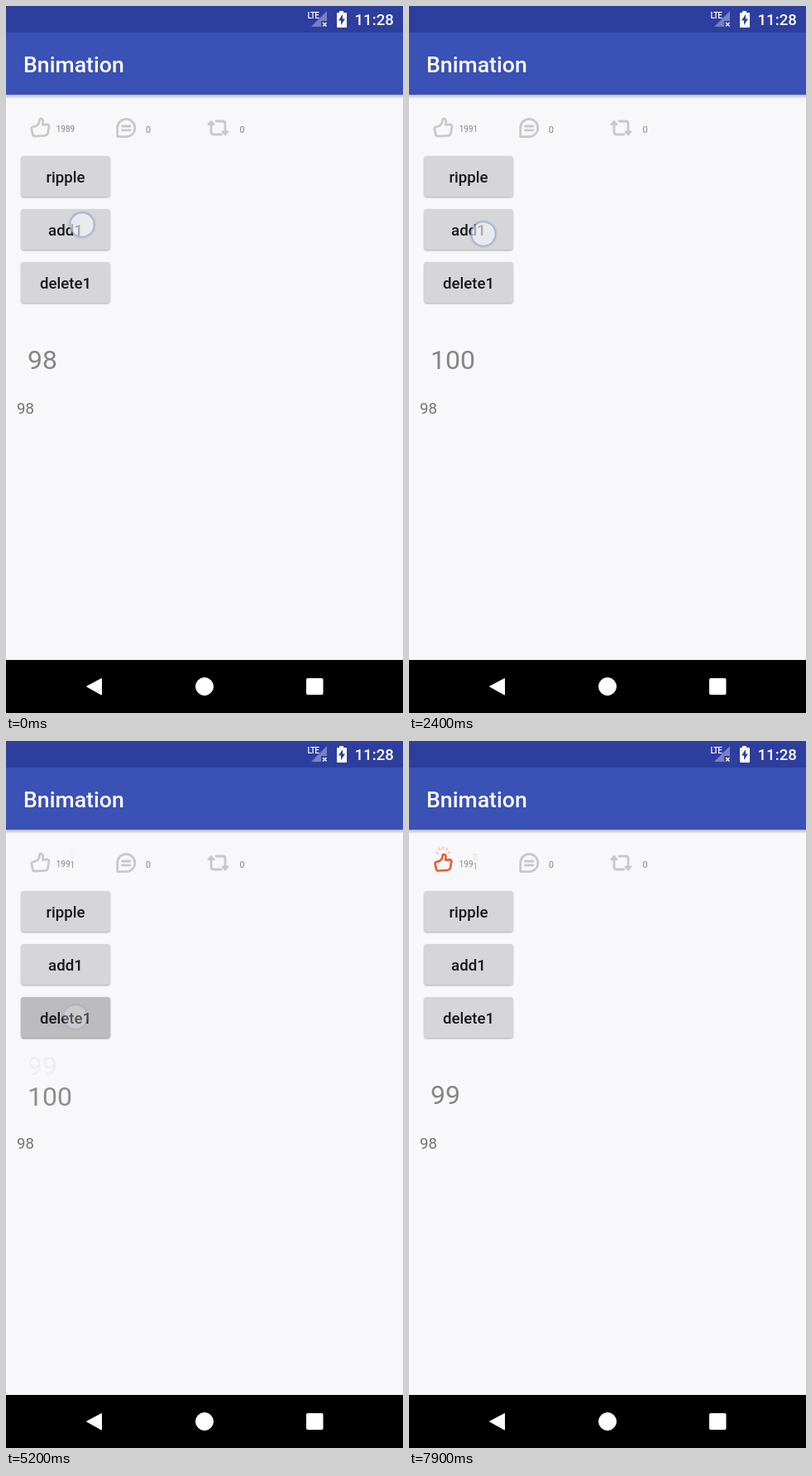
Recreate the animation shown at these times as an HTML page. Size 480 px wide and 853 px high, loop 8 s.

```html
<!DOCTYPE html>
<html lang="en">
<head>
<meta charset="utf-8">
<title>Bnimation</title>
<style>
  html, body { margin: 0; width: 100%; height: 100%; overflow: hidden; background: #f8f7fa; }
  svg { display: block; width: 100%; height: 100%; }
  text { font-family: Roboto, "Liberation Sans", sans-serif; }
  .medium { font-weight: 500; }
  .line { fill: none; stroke: #c9c8cb; stroke-width: 2.8; stroke-linecap: round; stroke-linejoin: round; }
</style>
</head>
<body>
<svg viewBox="0 0 480 853" id="stage">
  <defs>
    <linearGradient id="fade" x2="0" y2="1">
      <stop stop-color="#000" stop-opacity=".3"/>
      <stop offset="1" stop-color="#000" stop-opacity="0"/>
    </linearGradient>
    <filter id="soft" x="-10%" y="-20%" width="120%" height="140%"><feGaussianBlur stdDeviation="1.2"/></filter>
  </defs>
  <rect width="480" height="853" fill="#f8f7fa"/>

  <!-- status bar and toolbar -->
  <rect y="106" width="480" height="6" fill="url(#fade)"/>
  <rect width="480" height="107" fill="#3a51b5"/>
  <rect width="480" height="32" fill="#2d3e9f"/>
  <g fill="#fff">
    <path d="M369 25L388 6V18H381V25Z" opacity=".35"/>
    <path d="M383 20l4.500 4.500m0-4.500l-4.500 4.500" stroke="#fff" stroke-width="1.500"/>
    <text class="medium" x="364.500" y="15" font-size="10" letter-spacing="-.9">LTE</text>
    <path d="M403 6h5v2h3q1 0 1 1v16q0 1-1 1h-10q-1 0-1-1v-16q0-1 1-1h2z"/>
    <path d="M407 10l-5 7.500h3v5.500l5-7.500h-3z" fill="#2d3e9f"/>
    <text class="medium" x="421.500" y="23" font-size="18.670">11:28</text>
    <text class="medium" x="21" y="79.500" font-size="26.670">Bnimation</text>
  </g>

  <!-- action row -->
  <g id="thumb" class="line">
    <path d="M32 146L36 145C39 143.500 40.500 140.500 40.500 137.500C41 135.300 44.300 135.500 44.700 138.500L44.500 143.300L49.500 142.900C51.500 142.900 52.200 144.200 52 145.800L50.500 153.500C50 155.600 49 156.200 47 156.400L35.500 157.200C33.500 157.300 32.600 156.500 32.300 155L30.900 148.500C30.600 147 31 146.200 32 146Z"/>
  </g>
  <path id="shine" class="line" style="stroke:#f0592f;stroke-width:2" d="M33.500 134.500l1.500 1.300M36.500 129.500l1 2.200M41.300 128v2.200M46.300 129.500l-1 2.200M49 134l-1.700 1.300"/>
  <path class="line" d="M134.700 157.600V147A10.600 10.600 0 1 1 145.500 157.600ZM140.500 145h9.500M140.500 149.800h9.500"/>
  <g class="line">
    <path d="M248 142v10q0 3 3 3h9M254 139h8q3 0 3 3v10"/>
    <path d="M244.500 143l3.500-4 3.500 4zM261.500 151.500l3.500 4 3.500-4z" fill="#c9c8cb" stroke-width="2"/>
  </g>
  <g fill="#7f7f82" font-size="10.670">
    <text x="169" y="153">0</text>
    <text x="282.500" y="153">0</text>
  </g>

  <g id="buttons"></g>
  <g id="counters"></g>
  <text x="13" y="491.700" font-size="18.670" fill="#737375">98</text>
  <g id="touch">
    <circle r="16" fill="none" stroke="#8a8fa8" stroke-opacity=".2" stroke-width="2"/>
    <circle r="14.500" fill="#f4f4f8" fill-opacity=".66" stroke="#93a0cf" stroke-opacity=".75" stroke-width="1.500"/>
  </g>

  <!-- navigation bar -->
  <rect y="789" width="480" height="64" fill="#000"/>
  <g fill="#fff" stroke="#fff" stroke-linejoin="round">
    <path d="M97.500 821L115.500 811.500V831Z"/>
    <circle cx="240" cy="821" r="10.500"/>
    <rect x="363.500" y="811.500" width="19.500" height="19" rx="1"/>
  </g>
</svg>
<script>
const LOOP = 8000, HOLD = 130, ROLL = 500, THUMB = 250;
const taps = [
  { at: 55, x: 92, y: 264, button: 1, step: 1 },
  { at: 1325, x: 87, y: 275, button: 1, step: 1 },
  { at: 2525, x: 90, y: 275, button: 1, step: 1 },
  { at: 4025, x: 84, y: 333, button: 2, step: -1 },
  { at: 5113, x: 84, y: 333, button: 2, step: -1 },
  { at: 6625, x: 35, y: 147, step: 1 },
  { at: 7733, x: 44, y: 149, step: -1 }
];
const [like, unlike] = taps.slice(5);

const $ = id => document.getElementById(id);
const clamp = v => Math.min(1, Math.max(0, v));
const ease = v => (1 - Math.cos(Math.PI * clamp(v))) / 2;

function add(parent, tag, attrs, text = '') {
  const el = document.createElementNS('http://www.w3.org/2000/svg', tag);
  set(el, attrs);
  el.textContent = text;
  return parent.appendChild(el);
}
function set(el, attrs) {
  for (const key in attrs) el.setAttribute(key, attrs[key]);
}

const buttons = ['ripple', 'add1', 'delete1'].map((label, i) => {
  const y = 181 + 64 * i, root = $('buttons');
  const box = { x: 18.5, y, width: 107, height: 49, rx: 2.7 };
  const clip = add(root, 'clipPath', { id: 'clip' + i });
  add(clip, 'rect', box);
  const shadow = add(root, 'rect', { ...box, y: y + 1, filter: 'url(#soft)' });
  add(root, 'rect', { ...box, fill: '#d6d5d8' });
  const glow = add(root, 'rect', box);
  const wave = add(root, 'circle', { 'clip-path': `url(#clip${i})` });
  add(root, 'text', { class: 'medium', x: 72, y: y + 31.6, 'font-size': 18.67,
    'text-anchor': 'middle', fill: '#17171a' }, label);
  return { shadow, glow, wave };
});

function makeCounter(x, y, size, start, fill, counts) {
  const group = add($('counters'), 'g', { 'font-size': size, fill });
  const [head, before, after] = [0, 1, 2].map(() => add(group, 'text', { x, y }));
  return t => {
    let from = start, to = start, last = { at: -ROLL, step: 1 };
    for (const tap of taps) {
      if (tap.at > t || !counts(tap)) continue;
      from = to;
      to += tap.step;
      last = tap;
    }
    // Only the digits after the shared prefix roll.
    const a = String(from), b = String(to);
    let same = 0;
    if (a.length === b.length) while (same < a.length && a[same] === b[same]) same++;
    head.textContent = a.slice(0, same);
    before.textContent = a.slice(same);
    after.textContent = b.slice(same);
    const p = ease((t - last.at) / ROLL), travel = size * 1.172 * last.step;
    const left = x + (same ? head.getComputedTextLength() : 0);
    set(before, { x: left, y: y - travel * p, opacity: 1 - p });
    set(after, { x: left, y: y + travel * (1 - p), opacity: p });
  };
}
const counters = [
  makeCounter(60.7, 152.3, 10, 1989, '#828285', () => true),
  makeCounter(26, 437.5, 32, 98, '#858587', tap => tap.button)
];

function drawButtons(t) {
  buttons.forEach(({ shadow, glow, wave }, i) => {
    const tap = taps.find(p => p.button === i && t > p.at - HOLD && t < p.at + ROLL);
    const age = tap ? t - tap.at : -HOLD;
    const show = tap ? clamp((ROLL - age) / 350) : 0;
    const press = show * clamp((age + 30) / 80);
    set(shadow, { opacity: 0.32 + 0.16 * press });
    set(glow, { opacity: 0.06 * press });
    set(wave, { cx: tap ? tap.x : 0, cy: tap ? tap.y : 0,
      r: Math.max(0, 61 + (age - 75) * 0.6), opacity: 0.065 * show });
  });
}

function drawTouch(t) {
  const tap = taps.find(p => t >= p.at - HOLD && t < p.at + 150);
  set($('touch'), {
    transform: tap ? `translate(${tap.x} ${tap.y})` : '',
    opacity: tap ? clamp(1 - (t - tap.at) / 150) : 0
  });
}

function drawThumb(t) {
  const tap = t < unlike.at ? like : unlike;
  const p = (t - tap.at) / THUMB;
  const scale = 0.9 + 0.1 * Math.abs(1 - Math.min(2, Math.max(0, p)));
  const liked = t >= like.at + THUMB && t < unlike.at + THUMB;
  const shine = tap === like ? clamp(p - 1) : clamp(1 - p);
  const grow = tap === like ? shine : 1;
  set($('thumb'), {
    transform: `translate(41.5 146.5) scale(${scale}) translate(-41.5 -146.5)`,
    style: `stroke:${liked ? '#f0592f' : '#c9c8cb'}`
  });
  set($('shine'), {
    transform: `translate(41 144) scale(${grow}) translate(-41 -144)`,
    opacity: shine
  });
}

function draw(t) {
  drawButtons(t);
  drawTouch(t);
  drawThumb(t);
  counters.forEach(update => update(t));
}

const begin = performance.now();
function tick() {
  draw((performance.now() - begin) % LOOP);
  requestAnimationFrame(tick);
}
tick();
</script>
</body>
</html>
```
